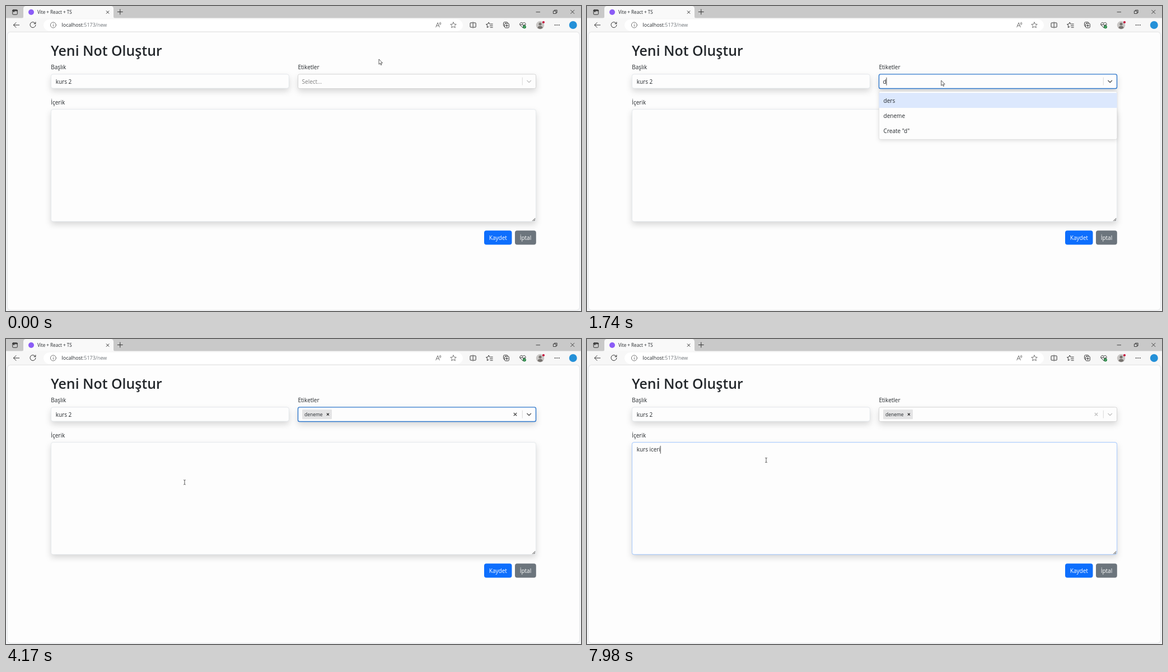
Recreate the animation shown at these times as an HTML page. Size 1027 by 545 pixels, loop 8 s.

```html
<!DOCTYPE html>
<html lang="tr">
<head>
<meta charset="utf-8">
<title>Yeni Not</title>
<style>
  html, body { margin: 0; width: 100%; height: 100%; overflow: hidden; background: #f6f7f9; }
  svg { display: block; width: 1027px; height: 545px; }
  text { font: 10px "Open Sans", "Noto Sans", sans-serif; fill: #24282c; white-space: pre; }
  .icon { fill: none; stroke: #333; stroke-width: 1; stroke-linecap: round; stroke-linejoin: round; }
  .field { fill: #fdfdfd; stroke: #dee2e6; stroke-width: .8; filter: drop-shadow(0 5.3px 5.3px rgba(0, 0, 0, .15)); }
  .button { fill: #fff; text-anchor: middle; }
  #menuBox { fill: #fdfdfd; stroke: rgba(0, 0, 0, .12); stroke-width: .7; filter: drop-shadow(0 2.7px 3.6px rgba(0, 0, 0, .12)); }
</style>
</head>
<body>
<svg viewBox="0 0 1027 545">
  <!-- Browser tabs -->
  <rect width="1027" height="22" fill="#c9c9c9"/>
  <path d="M28 22q3 0 3-3V5q0-5 5-5H187q5 0 5 5V19q0 3 3 3Z" fill="#f9f9f9"/>
  <rect y="21.5" width="1027" height="26" fill="#f7f7f7"/>
  <g class="icon">
    <rect x="11.7" y="6.7" width="8.6" height="8.6" rx="1.5"/>
    <path d="M12 8.2H20M14 8.5V10" stroke-width="2"/>
    <path d="M179.3 8.8l4.6 4.6m0-4.6l-4.6 4.6M199.3 10.5h9m-4.5-4.5v9"/>
    <path d="M947 10.8h6.6M1008.7 7.4l6.2 6.2m0-6.2l-6.2 6.2" stroke-width=".9"/>
    <path d="M977.8 8.9h4.6v4.6h-4.6ZM979.4 8.7V7.3h4.8v4.8h-1.5" stroke-width=".9"/>
  </g>
  <circle cx="45" cy="11" r="5" fill="#8b5cf6"/>
  <text x="56" y="13.6" style="font-size:8.1px">Vite + React + TS</text>

  <!-- Toolbar -->
  <rect x="67" y="24" width="749" height="20.5" rx="10.2" fill="#fff"/>
  <g class="icon">
    <path d="M23.7 34H13.5m4.4-4.4L13.5 34l4.4 4.4"/>
    <path d="M52.5 31.4A5 5 0 1 0 53 34M52.9 28.8v2.9H50"/>
    <g stroke="#555" stroke-width=".8"><circle cx="84.4" cy="34" r="5"/><path d="M84.4 33.6v2.7m0-4.6v.1"/></g>
    <g stroke="#555" stroke-width=".8">
      <path d="M767.8 37.8l3.2-8 3.2 8m-5.3-2.7h4.2M774.3 30q1.2 1.2 0 2.6m1.6-3.6q2 2.2 0 4.6"/>
      <path transform="translate(799 34.3)" d="M0-5.3 1.6-1.9 5.2-1.6 2.5.8 3.3 4.5 0 2.5-3.3 4.5-2.5.8-5.2-1.6-1.6-1.9Z"/>
    </g>
    <path d="M833 30h-3q-1 0-1 1v6q0 1 1 1h3m2.2-8h3q1 0 1 1v6q0 1-1 1h-3M834.1 28.8v10.4"/>
    <path d="M865 32.2h-1.2l-1.6-3.1-1.5 3.1-3.2.5 2.3 2.3-.5 3.5 2.9-1.5M866 32.2h3.2m-4.8 3h4.8m-4.2 3h4.2"/>
    <path d="M890.5 36.5q-2 0-2-1.8v-4q0-1.9 1.9-1.9h4q1.7 0 1.8 1.5"/>
    <rect x="890.7" y="31" width="7.6" height="8" rx="1.6"/>
    <path d="M894.5 33v4m-2-2h4"/>
    <path d="M923 38.8l-4.3-4.3c-2.8-3 1.6-7 4.3-3.6 2.7-3.4 7.1.6 4.3 3.6ZM918 33.7h2.7l1.3-1.8 1.8 3.3 1-1.5h2"/>
  </g>
  <circle cx="926" cy="37.3" r="2.9" fill="#188038"/>
  <path d="M924.7 37.3l1 1 1.7-1.9" fill="none" stroke="#fff" stroke-width=".8"/>
  <circle cx="954" cy="34.3" r="7.2" fill="#c8c6c4"/>
  <circle cx="954" cy="32.2" r="2.5" fill="#77736f"/>
  <path d="M949.5 39.2q0-3.5 4.5-3.5t4.5 3.5q-4.5 3.4-9 0" fill="#77736f"/>
  <circle cx="960" cy="29" r="2.1" fill="#c50f3c"/>
  <g fill="#333"><circle cx="980.7" cy="34" r=".9"/><circle cx="984.2" cy="34" r=".9"/><circle cx="987.7" cy="34" r=".9"/></g>
  <circle cx="1012.8" cy="34" r="7" fill="#2490d8"/>
  <text x="99.5" y="37.3" style="font-size:8.95px">localhost<tspan fill="#70757a">:5173/new</tspan></text>

  <!-- Page -->
  <rect x="3" y="47" width="1021" height="496" rx="5" fill="#fdfdfd" style="filter:drop-shadow(0 0 1px rgba(0,0,0,.2))"/>
  <text x="80" y="89.3" style="font-size:24.9px;font-weight:600">Yeni Not Oluştur</text>
  <text x="80.2" y="112.6">Başlık</text>
  <text x="521.5" y="112.6">Etiketler</text>
  <text x="80.2" y="175.6">İçerik</text>

  <rect class="field" x="80.4" y="121.9" width="425" height="25.2" rx="3.5"/>
  <text x="88.7" y="138.6">kurs 2</text>

  <rect class="field" id="area" x="80.4" y="184.7" width="866.2" height="200.4" rx="3.5"/>
  <path class="icon" d="M940.5 384l4.5-4.5m-2 4.5l2-2" stroke-width=".8"/>
  <text id="note" x="88.7" y="201.4"></text>

  <rect class="field" id="select" x="521.5" y="121.9" width="425" height="25.6" rx="2.8"/>
  <path d="M922.3 127.5V141.5" stroke="#ccc" stroke-width=".7"/>
  <path id="chevron" d="M930.8 133.2l3.4 3.3 3.4-3.3" fill="none" stroke-width="1.3" stroke-linecap="round"/>
  <text id="query" x="528.6" y="138.6"></text>
  <g id="tag">
    <rect x="529" y="126" width="53" height="17.3" rx="1.4" fill="#e4e4e5"/>
    <text x="533" y="137.7" style="font-size:8.5px">deneme</text>
    <path d="M572.9 132.6l4 4m0-4l-4 4" stroke="#222" stroke-width="1.2"/>
    <path id="clear" d="M906.8 131.9l5.4 5.4m0-5.4l-5.4 5.4" stroke-width="1.4"/>
  </g>

  <rect x="854" y="401.3" width="49.5" height="25.2" rx="4" fill="#0d6efd"/>
  <text class="button" x="878.8" y="417.7">Kaydet</text>
  <rect x="909" y="401.3" width="37.8" height="25.2" rx="4" fill="#6c757d"/>
  <text class="button" x="927.9" y="417.7">İptal</text>

  <g id="menu">
    <rect id="menuBox" x="521.4" y="152.6" width="425.4" rx="2.8"/>
    <rect x="521.4" y="155.3" width="425.4" height="26.8" fill="#dce8fd"/>
    <text x="529.6" y="173"></text>
    <text x="529.6" y="199.8"></text>
    <text x="529.6" y="226.6"></text>
  </g>

  <path id="caret" stroke="#222" stroke-width=".8"/>
  <path id="arrow" d="M0 0V9.2L2.1 7.3 3.6 10.5 5 9.9 3.6 6.8H6.5Z" fill="#fff" stroke="#333" stroke-width=".8" stroke-linejoin="round"/>
  <path id="beam" d="M-1.8-4.2Q0-4.2 0-3.2 0-4.2 1.8-4.2M0-3.4V3.4M-1.8 4.2Q0 4.2 0 3.2 0 4.2 1.8 4.2" fill="none" stroke="#333" stroke-width=".8"/>
</svg>
<script>
const LOOP = 8000;
const OPEN = 1000, PICK = 3200, FOCUS_NOTE = 4600;
const TAG = { word: 'deneme', start: 1680, gap: 185 };
const NOTE = { word: 'kurs iceri', start: 5900, gap: 220 };
const PATH = [[60, 666, 95], [600, 631, 146.5], [900, 632.7, 133], [3350, 632.7, 133],
  [4080, 319, 256], [4250, 319, 256], [4560, 320, 216.5]];

const $ = id => document.getElementById(id);
const clamp = (v, lo, hi) => Math.min(hi, Math.max(lo, v));
const show = (id, on) => $(id).setAttribute('visibility', on ? 'visible' : 'hidden');
const set = (id, attrs) => { for (const k in attrs) $(id).setAttribute(k, attrs[k]); };
const options = [...$('menu').querySelectorAll('text')];

function typed({ word, start, gap }, t) {
  const n = clamp(Math.floor((t - start) / gap) + 1, 0, word.length);
  return { text: word.slice(0, n), last: n ? start + gap * (n - 1) : 0 };
}

function pointer(t) {
  let i = 0;
  while (i < PATH.length - 2 && t > PATH[i + 1][0]) i++;
  const [t0, x0, y0] = PATH[i], [t1, x1, y1] = PATH[i + 1];
  const p = clamp((t - t0) / (t1 - t0), 0, 1), e = p * p * (3 - 2 * p);
  return [x0 + (x1 - x0) * e, y0 + (y1 - y0) * e];
}

function drawMenu(query) {
  const list = ['ders', TAG.word].filter(o => o.startsWith(query));
  if (query && !list.includes(query)) list.push(`Create "${query}"`);
  options.forEach((o, i) => o.textContent = list[i] || '');
  set('menuBox', { height: 5.4 + 26.8 * list.length });
}

function draw(t) {
  const selecting = t >= OPEN && t < FOCUS_NOTE, writing = t >= FOCUS_NOTE;
  const picked = t >= PICK, menu = selecting && !picked;
  const query = typed(TAG, t), note = typed(NOTE, t);

  $('select').style.stroke = selecting ? '#2f78cc' : '#ccc';
  $('select').style.strokeWidth = selecting ? 1.4 : .8;
  $('area').style.stroke = writing ? '#86b7fe' : '#dee2e6';
  const tint = selecting ? '#555' : '#c4c4c4';
  set('chevron', { stroke: tint });
  set('clear', { stroke: tint });

  $('query').textContent = picked ? '' : query.text || 'Select...';
  $('query').style.fill = query.text ? '#24282c' : '#808080';
  $('note').textContent = note.text;
  show('tag', picked);
  show('menu', menu);
  if (menu) drawMenu(query.text);

  const since = writing ? Math.max(FOCUS_NOTE, note.last) : picked ? PICK : Math.max(OPEN, query.last);
  show('caret', (selecting || writing) && (t - since) % 1060 < 530);
  const width = id => $(id).getComputedTextLength();
  const x = writing ? 88.9 + width('note') : picked ? 585.5 : 528.8 + (query.text ? width('query') : 0);
  set('caret', { d: `M${x} ${writing ? 190.8 : 127.8}v14` });

  const [px, py] = pointer(t), overNote = py > 185;
  const transform = `translate(${px} ${py})`;
  set('arrow', { transform });
  set('beam', { transform });
  show('arrow', !overNote);
  show('beam', overNote);
}

const begin = performance.now();
function frame() {
  draw((performance.now() - begin) % LOOP);
  requestAnimationFrame(frame);
}
frame();
</script>
</body>
</html>
```
